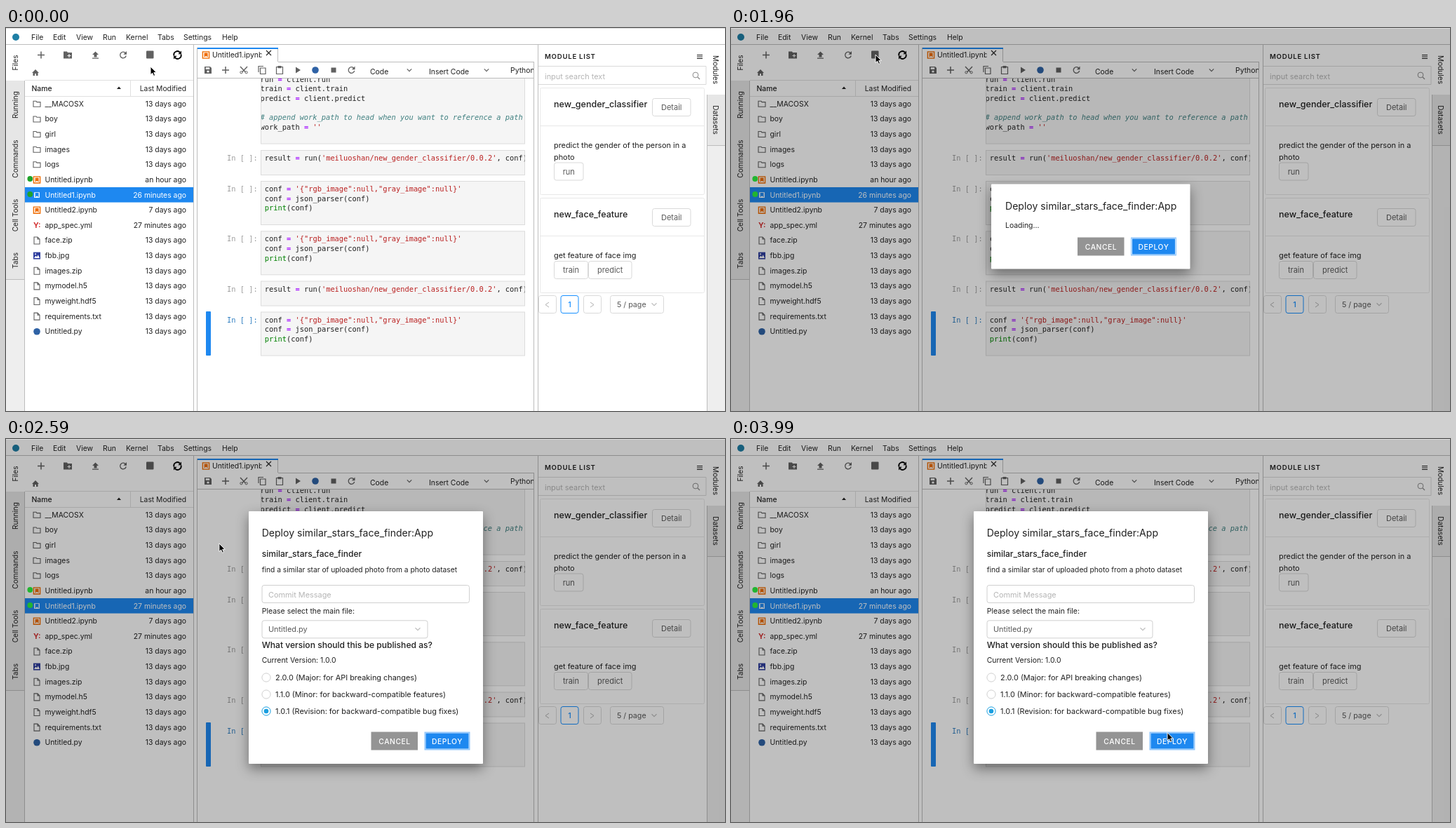
Animation, 1025 px wide and 546 px high, one loop 4060 ms. Source, as an HTML page:

```html
<!DOCTYPE html>
<html lang="en">
<head>
<meta charset="utf-8">
<title>Deploy dialog</title>
<style>
html, body { margin: 0; width: 100%; height: 100%; overflow: hidden; background: #fff; }
svg { display: block; width: 100%; height: 100%; }
text { font-family: Inter, Roboto, sans-serif; white-space: pre; }
.code text { font: 10.36px "DejaVu Sans Mono", "Liberation Mono", monospace; fill: #212121; }
.str { fill: #ba2121; }
.op { fill: #a2f; font-weight: bold; }
.fn { fill: #008000; }
.note { fill: #408080; font-style: italic; }
.dialog { filter: drop-shadow(0 7px 9px rgba(0,0,0,.42)); }
</style>
</head>
<body>
<svg id="stage" viewBox="0 0 1025 546" xmlns="http://www.w3.org/2000/svg"></svg>
<script>
const LOOP = 4060, STEP = 70;
const INK = '#212121', GREY = '#616161', EDGE = '#bdbdbd', BLUE = '#1e88f0', RING = '#1a9fe0';

const box = (x, y, w, h, fill, stroke = 'none', r = 0) =>
  `<rect x="${x}" y="${y}" width="${w}" height="${h}" fill="${fill}" stroke="${stroke}" rx="${r}"/>`;
const path = (d, stroke = GREY, w = 1.2, fill = 'none') =>
  `<path d="${d}" fill="${fill}" stroke="${stroke}" stroke-width="${w}"/>`;
const solid = (d, fill = GREY) => path(d, 'none', 0, fill);
const dot = (x, y, r, fill, stroke = 'none') =>
  `<circle cx="${x}" cy="${y}" r="${r}" fill="${fill}" stroke="${stroke}"/>`;
const text = (x, y, s, size = 10.4, fill = INK, more = '') =>
  `<text x="${x}" y="${y}" font-size="${size}" fill="${fill}" ${more}>${s}</text>`;
const at = (x, y, s) => `<g transform="translate(${x} ${y})">${s}</g>`;
const END = 'text-anchor="end"', MID = 'text-anchor="middle"', MEDIUM = 'font-weight="500"';
const button = (x, y, w, s) =>
  box(x + .5, y + .5, w, 25, '#fff', '#d9d9d9', 3) + text(x + .5 + w / 2, y + 17, s, 11, '#595959', MID);
const chevron = (x, y, c = GREY, s = 3.2) => path(`M${x - s} ${y - s / 2}l${s} ${s}l${s}${-s}`, c);

// Icons are centred on 0,0
const icon = {
  plus: path('M-5 0H5M0-5V5', GREY, 1.5),
  folder: path('M-5-4H-1L0-2.7H5V4H-5Z', GREY, 1.1),
  newFolder: solid('M-6-5H-1L0-3.5H6V5H-6Z') + path('M-.5 1H4.5M2-1.5V3.5', '#fff', 1.1),
  file: path('M-4-5H1L4-2V5H-4ZM1-5V-2H4', GREY, 1.1),
  upload: solid('M0-5L4.5-.5H2V3H-2V-.5H-4.5ZM-4.5 4H4.5V5.3H-4.5Z'),
  refresh: path('M3.5-2.5A4.3 4.3 0 1 0 4.2 1', GREY, 1.3) + solid('M5-5.5V-.8H.4Z'),
  sync: path('M-5 1A5 5 0 0 1 3.6-3.6M5-1A5 5 0 0 1-3.6 3.6', '#000', 1.9) +
    solid('M5.5-6V-1.3H.8ZM-5.5 6V1.3H-.8Z', '#000'),
  app: box(-5, -6, 10.5, 11, GREY, 'none', 1),
  home: solid('M-5 .5L0-4.5L5 .5H3.5V4.5H1V1.5H-1V4.5H-3.5V.5Z'),
  save: solid('M-5-5H3L5-3V5H-5Z') + box(-3.3, -3.8, 5.5, 2.6, '#fff') + dot(0, 2, 1.6, '#fff'),
  cut: path('M-5-5L4 4.5M5-5L-4 4.5', GREY, 1.4) + dot(-3.6, 3.3, 1.6, '#fff', GREY) + dot(3.6, 3.3, 1.6, '#fff', GREY),
  copy: path('M-5 3V-5.5H2M-2.5-3H5V5.5H-2.5Z'),
  paste: path('M-4.5-4.5H4.5V5.5H-4.5Z') + box(-2.5, -6, 5, 3.2, GREY),
  play: solid('M-3-4.5L4 0L-3 4.5Z'),
  stop: box(-3.5, -3.5, 7, 7, GREY),
  python: dot(0, 0, 4.8, '#2f62a5'),
  yaml: text(-5, 4, 'Y:', 10.5, '#d32f2f', 'font-weight="700"'),
  image: box(-5, -5, 10, 10, '#303f9f') + solid('M-4 3.5L-1.5 0L0 1.8L1.8-1L4 3.5Z', '#fff') + dot(-2, -2.3, 1, '#fff'),
};
const notebook = (c = '#ef6c00') => path('M-4.6-4.6H4.6V4.6H-4.6Z', c, 1.4, '#fff') + solid('M-2.4-3H2.6V3.3L.1 1.2L-2.4 3.3Z', c);

const NOW = 'just', DAYS = '13 days ago';
const files = [
  ['folder', '__MACOSX'], ['folder', 'boy'], ['folder', 'girl'], ['folder', 'images'], ['folder', 'logs'],
  ['nb', 'Untitled.ipynb', 'an hour ago'], ['nb', 'Untitled1.ipynb', ''], ['nb', 'Untitled2.ipynb', '7 days ago'],
  ['yaml', 'app_spec.yml', '27 minutes ago'], ['file', 'face.zip'], ['image', 'fbb.jpg'], ['file', 'images.zip'],
  ['file', 'mymodel.h5'], ['file', 'myweight.hdf5'], ['file', 'requirements.txt'], ['python', 'Untitled.py'],
];

function menuBar() {
  const items = [['File', 36], ['Edit', 67], ['View', 100], ['Run', 138], ['Kernel', 171], ['Tabs', 216], ['Settings', 253], ['Help', 308]];
  return box(0, 0, 1025, 1, '#dcdcdc') + path('M0 23.5H1025', EDGE, 1) + dot(14, 13, 5, '#1f7fa5') +
    items.map(([s, x]) => text(x, 16.8, s)).join('');
}

function sideTabs() {
  const left = [['Files', 24, 75], ['Running', 75, 144], ['Commands', 144, 229], ['Cell Tools', 229, 305], ['Tabs', 305, 358]];
  const right = [['Modules', 24, 95], ['Datasets', 95, 167]];
  const tab = (x, turn) => ([s, a, b], i) =>
    box(x, a, 26, b - a, i ? '#e6e6e6' : '#fff') + path(`M${x} ${b + .5}h26`, EDGE, 1) +
    `<g transform="translate(${x + 13} ${(a + b) / 2}) rotate(${turn})">${text(0, 3.7, s, 10.1, INK, MID)}</g>`;
  return box(0, 24, 26, 522, '#eee') + box(1000, 24, 25, 522, '#eee') +
    left.map(tab(0, -90)).join('') + right.map(tab(999, 90)).join('') +
    path('M26.5 75V546M999.5 95V546', EDGE, 1);
}

function fileBrowser() {
  const tools = [['plus', 50], ['newFolder', 88], ['upload', 127.5], ['refresh', 167]];
  const rows = files.map(([kind, name, when = DAYS], i) => {
    const y = 108 + 21.63 * i, on = i === 6, ink = on ? '#fff' : INK;
    const mark = kind === 'nb' ? notebook(on ? BLUE : undefined) : icon[kind];
    return (on ? box(27, y - 10.8, 240, 21.6, BLUE) : '') + at(44, y + .3, mark) +
      text(55.5, y + 3.8, name, 10.4, ink) + text(257, y + 3.8, when, 10.4, ink, END + (on ? ' id="age"' : ''));
  }).join('');
  return tools.map(([k, x]) => at(x, 38.5, icon[k])).join('') +
    `<g id="hover">${box(186.5, 27.5, 37.5, 21.5, '#fff', '#bdbdbd')}</g>` +
    at(205, 38.5, icon.app) + at(244.5, 38.5, icon.sync) + at(42, 63.5, icon.home) +
    path('M27 74.5H267M27 97.5H267M177.5 75V97', '#e0e0e0', 1) +
    text(36.5, 89.6, 'Name', 10.4, INK, MEDIUM) + text(257, 89.6, 'Last Modified', 10.3, INK, END) +
    solid('M158 87L161 83.5L164 87Z', INK) + rows + path('M267.5 24V546', EDGE, 1);
}

const paint = s => s[0] === '#' ? `<tspan class="note">${s}</tspan>` :
  s.replace(/'[^']*'|=|print/g, m => `<tspan class="${m[0] === "'" ? 'str' : m === '=' ? 'op' : 'fn'}">${m}</tspan>`);
const lines = (x, y, list) => list.map((s, i) => `<text x="${x}" y="${y + 13.6 * i}">${paint(s)}</text>`).join('');

function editor() {
  const call = ["result = run('meiluoshan/new_gender_classifier/0.0.2', conf)"];
  const parse = [`conf = '{"rgb_image":null,"gray_image":null}'`, 'conf = json_parser(conf)', 'print(conf)'];
  const head = ['run = client.run', 'train = client.train', 'predict = client.predict', '',
    '# append work_path to head when you want to reference a path', "work_path = ''"];
  const cells = [[174, 35, call], [218, 62, parse], [289.3, 62, parse], [360.5, 35, call], [404.5, 62, parse]];
  const tools = [['save', 288], ['plus', 313], ['cut', 339], ['copy', 365], ['paste', 390], ['play', 416],
    ['python', 441], ['stop', 467], ['refresh', 492.5]];
  return box(268, 24, 490, 24, '#fff') + box(273, 28, 115, 20, '#fff') +
    path('M272.5 28V546M387.5 28V48M388 48.5H752M752.5 48V546M758.5 24V546', EDGE, 1) + box(273, 28, 115, 2, BLUE) +
    at(285, 38.5, notebook()) + `<g clip-path="url(#tabClip)">${text(294, 42, 'Untitled1.ipynb')}</g>` +
    path('M371 32L378 39M378 32L371 39', INK, 1.1) +
    tools.map(([k, x]) => at(x, 60, icon[k])).join('') +
    text(519, 66, 'Code') + chevron(575, 60) + text(603, 66, 'Insert Code') + chevron(685, 60) +
    `<g clip-path="url(#bookClip)">${text(719, 64, 'Python 3')}</g>` +
    path('M273 71.5H752', EDGE, 1) + box(285, 404, 7, 63, BLUE, 'none', 1) +
    `<g class="code"><g clip-path="url(#bookClip)">${box(363.5, 50, 376, 115, '#f5f5f5', '#dcdcdc')}</g>` +
    box(274, 49, 478, 22.5, '#fff') +
    cells.map(([y, h, list], i) => box(363.5, y + .5, 376, h, '#f5f5f5', '#dcdcdc') +
      `<text x="315" y="${y + 15}" style="fill:${i === 4 ? '#307fc1' : '#9e9e9e'}">In [ ]:</text>`).join('') +
    `<g clip-path="url(#codeClip)">${lines(362.5, 76.8, head)}${cells.map(([y, , list]) => lines(368.8, y + 15, list)).join('')}</g></g>` +
    tools.map(([k, x]) => at(x, 60, icon[k])).join('') +
    text(519, 66, 'Code') + chevron(575, 60) + text(603, 66, 'Insert Code') + chevron(685, 60) +
    `<g clip-path="url(#bookClip)">${text(719, 64, 'Python 3')}</g>` + path('M273 71.5H752', EDGE, 1);
}

function modules() {
  const card = (y, h, name) => box(761.5, y + .5, 234, h, '#fff', '#e8e8e8', 2) + path(`M762 ${y + 54.5}H995`, '#e8e8e8', 1) +
    text(781, y + 27.5, name, 12.5, INK, MEDIUM) + button(921, y + 15, 54.5, 'Detail');
  return text(768, 44, 'MODULE LIST', 9.6, INK, 'font-weight="600" letter-spacing=".75"') +
    path('M985 38.5H993M985 41H993M985 43.5H993', INK, 1.2) + path('M759 54.5H998V80.5H759', '#d9d9d9', 1) +
    text(768, 72.5, 'input search text', 10.9, '#b5b5b5') + dot(983, 67, 3.9, 'none', '#8c8c8c') + path('M986 70L989 73', '#8c8c8c') +
    card(85, 152, 'new_gender_classifier') + card(242, 135, 'new_face_feature') +
    text(781, 171.3, 'predict the gender of the person in a', 10.9) + text(781, 188, 'photo', 10.9) + button(781, 191.5, 41.5, 'run') +
    text(781, 328, 'get feature of face img', 10.9) + button(781, 332, 48, 'train') + button(830, 332, 61.5, 'predict') +
    [[759, '#d9d9d9'], [790.5, '#1890ff'], [823, '#d9d9d9']].map(([x, c]) => box(x + .5, 381.5, 25, 25, '#fff', c, 3)).join('') +
    path('M774 391L769 394.5L774 398M833 391L838 394.5L833 398', '#b0b0b0', 1) + text(803.5, 398.4, '1', 11, '#1890ff', MID + ' ' + MEDIUM) +
    box(861.5, 381.5, 76, 25, '#fff', '#d9d9d9', 3) + text(871, 398.3, '5 / page', 10.7, '#595959') + chevron(924, 394, '#bfbfbf', 3.5);
}

const label = 'font-weight="500" letter-spacing=".55" text-anchor="middle"';
const actions = (x, y) => box(x, y, 66.5, 26, '#949494') + text(x + 33.5, y + 17.2, 'CANCEL', 10.3, '#fff', label) +
  box(x + 76.5, y + .5, 64, 25, BLUE, '#8fc6fb') + box(x + 77.5, y + 1.5, 62, 23, 'none', '#d5eaff') +
  text(x + 108.5, y + 17.2, 'DEPLOY', 10.3, '#fff', label);
const title = (x, y) => text(x, y, 'Deploy similar_stars_face_finder:App', 14.05);

function dialogs() {
  const choices = ['2.0.0 (Major: for API breaking changes)', '1.1.0 (Minor: for backward-compatible features)',
    '1.0.1 (Revision: for backward-compatible bug fixes)'];
  const radios = choices.map((s, i) => {
    const y = 340 + 24 * i;
    return `<circle class="ring" cx="371" cy="${y}" r="6.1" fill="#fff" stroke="#d0d0d0"/>` +
      (i === 2 ? dot(371, y, 3.3, RING) : '') + text(384, y + 4, s, 10.9);
  }).join('');
  return `<g id="small">${`<g class="dialog">${box(371, 222.5, 283.5, 121, '#fff', 'none', 1)}</g>`}` +
    title(391, 258.5) + text(391, 285, 'Loading...', 10.4) + actions(494, 298.5) + '</g>' +
    `<g id="large"><g class="dialog">${box(346, 103, 334, 360, '#fff', 'none', 1)}</g>` + title(364.7, 139) +
    text(364.7, 168, 'similar_stars_face_finder', 12.05, INK, MEDIUM) +
    text(364.7, 189.5, 'find a similar star of uploaded photo from a photo dataset', 10.25) +
    box(365, 208.5, 295.5, 25, '#fff', '#d0d0d0', 3) + text(374, 225.6, 'Commit Message', 10.9, '#b5b5b5') +
    text(364.7, 248.8, 'Please select the main file:', 10.5) +
    box(365, 258.8, 236, 25, '#fff', '#d0d0d0', 3) + text(374, 275.3, 'Untitled.py', 10.9, '#595959') + chevron(587, 271, '#bfbfbf', 3.5) +
    text(364.7, 298, 'What version should this be published as?', 12.1, INK, MEDIUM) +
    text(364.7, 318.7, 'Current Version: 1.0.0', 10.45) + radios + actions(520.5, 417.5) + '</g>';
}

const clip = (id, x, y, w, h) => `<clipPath id="${id}">${box(x, y, w, h, '#000')}</clipPath>`;
const stage = document.getElementById('stage');
stage.innerHTML = '<defs>' + clip('tabClip', 290, 28, 74.5, 20) + clip('bookClip', 273, 50, 479, 496) + clip('codeClip', 364, 72, 375.5, 470) + '</defs>' +
  box(0, 0, 1025, 546, '#fff') + menuBar() + sideTabs() + fileBrowser() + editor() + modules() +
  `<g id="shade">${box(0, 1, 1025, 545, 'rgba(0,0,0,.25)')}</g>` +
  `<g id="live">${dot(34.3, 215, 3.9, 'inherit')}${dot(34.3, 237, 3.9, 'inherit')}</g>` + dialogs() +
  `<g id="cursor"><g id="arrow">${path('M0 0V11.6L2.7 9.2L4.6 13.4L6.6 12.5L4.8 8.4H8.3Z', '#fff', 1, '#000')}</g>` +
  `<g id="hand">${path('M-1.2-1Q.2-2.6 1.5-1V3.6L6 4.6Q7.6 5.2 7.3 7L6.5 12.5H-.3L-3.6 8Q-4.6 6.2-3 6L-1.2 7.2Z', '#000', 1, '#fff')}</g></g>`;

const el = id => document.getElementById(id);
const rings = stage.querySelectorAll('.ring');
const show = (id, on) => el(id).setAttribute('visibility', on ? 'visible' : 'hidden');

// start, end, destination of each pointer move
const moves = [[0, 490, 206, 44], [1330, 1680, 206, 38], [2310, 3010, 484, 353], [3360, 3920, 622, 418.5]];
function pointer(t) {
  let x = 206, y = 55;
  for (const [a, b, tx, ty] of moves) {
    const p = Math.min(1, Math.max(0, (t - a) / (b - a))), e = p * p * (3 - 2 * p);
    x += (tx - x) * e;
    y += (ty - y) * e;
  }
  return [x, y];
}

function draw(t) {
  const [x, y] = pointer(t), modal = t >= 1960, large = t >= 2100;
  const row = large && x > 364 && x < 650 ? Math.floor((y - 328) / 24) : -1;
  const onLabel = row >= 0 && row < 3;
  show('hover', t >= 1050 && !modal);
  show('shade', modal);
  show('small', modal && !large);
  show('large', large);
  show('hand', onLabel);
  show('arrow', !onLabel);
  el('live').setAttribute('fill', modal ? '#22b530' : '#1fa329');
  el('age').textContent = (t < 2590 ? 26 : 27) + ' minutes ago';
  rings.forEach((r, i) => r.setAttribute('stroke', i === 2 || i === row ? RING : '#d0d0d0'));
  el('cursor').setAttribute('transform', `translate(${x} ${y})`);
}

const start = performance.now();
function tick() {
  const t = (performance.now() - start) % LOOP;
  draw(Math.floor(t / STEP) * STEP);
  requestAnimationFrame(tick);
}
draw(0);
tick();
</script>
</body>
</html>
```
